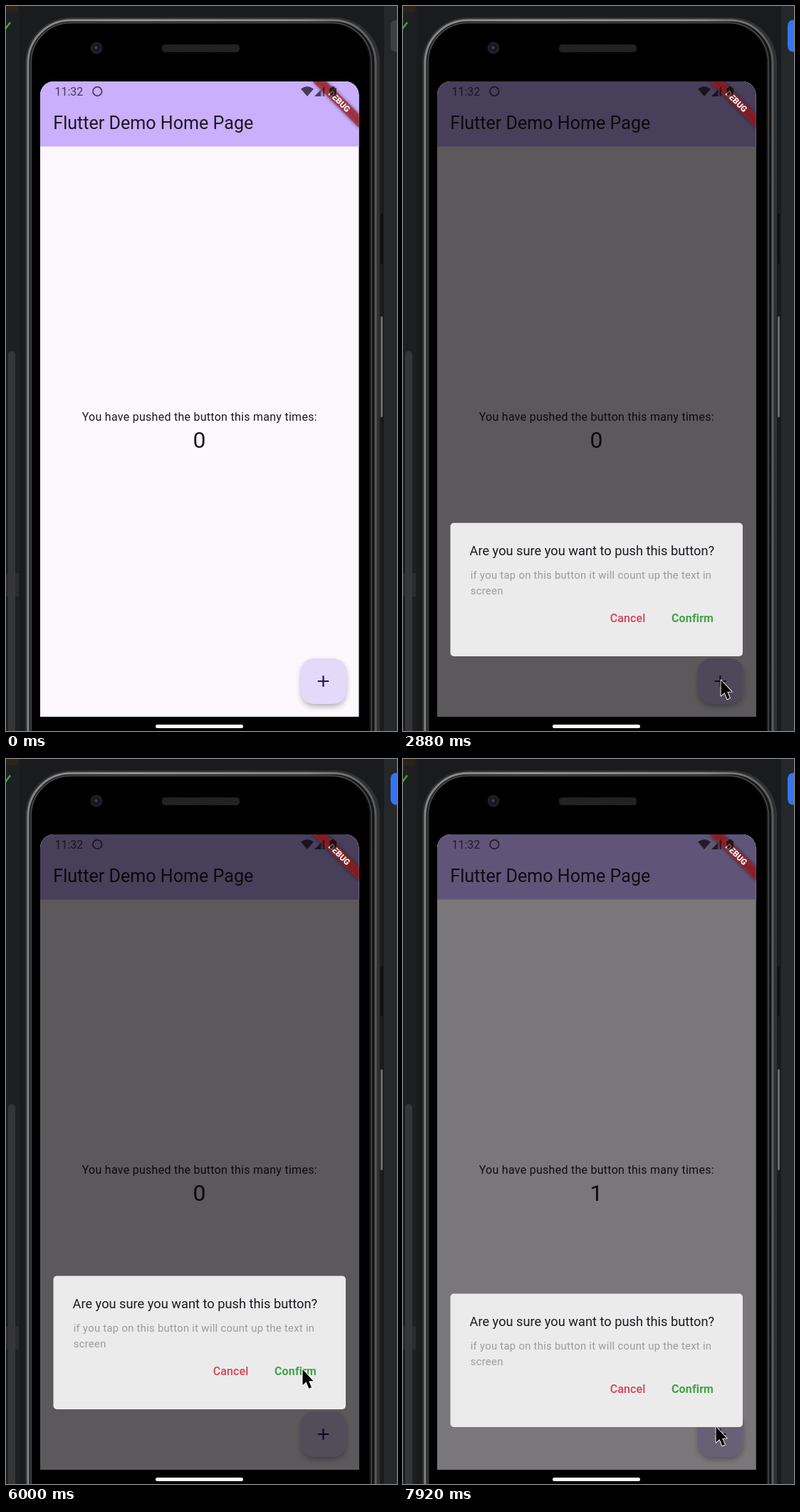
An HTML page that plays this animation: 549x1019 px, repeating every 8 s.

```html
<!DOCTYPE html>
<html lang="en">
<head>
<meta charset="utf-8">
<title>Confirm dialog demo</title>
<style>
  html, body { margin: 0; width: 100%; height: 100%; overflow: hidden; background: #1e2022; }
  svg { display: block; width: 549px; height: 1019px; }
  text { font-family: Roboto, sans-serif; fill: #1c1a1f; white-space: pre; }
  .body { font-size: 15.97px; letter-spacing: .285px; }
  .mid { text-anchor: middle; }
  .hint { font-size: 14.83px; letter-spacing: .285px; fill: #9b9a9c; }
  .action { font-size: 15.97px; letter-spacing: .15px; }
</style>
</head>
<body>
<svg viewBox="0 0 549 1019">
  <defs>
    <linearGradient id="rim" x1="0" x2="1" y1="0" y2="0">
      <stop offset="0" stop-color="#838384"/>
      <stop offset=".3" stop-color="#9a9a9b"/>
      <stop offset=".8" stop-color="#8c8c8d"/>
      <stop offset="1" stop-color="#5a5a5b"/>
    </linearGradient>
    <pattern id="mesh" width="4" height="4" patternUnits="userSpaceOnUse">
      <rect width="4" height="4" fill="#1d1d1d"/>
      <path d="M0 4L4 0" stroke="#303030"/>
    </pattern>
    <clipPath id="screen"><path d="M48 999V125a19 19 0 0 1 19-19H476.500a19 19 0 0 1 19 19V999z"/></clipPath>
    <filter id="soft" x="-50%" y="-50%" width="200%" height="200%"><feGaussianBlur stdDeviation="4"/></filter>
    <filter id="softBand" x="-50%" y="-100%" width="200%" height="300%"><feGaussianBlur stdDeviation="2.500"/></filter>
  </defs>

  <!-- desktop -->
  <rect width="549" height="1019" fill="#1a1b1c"/>
  <rect width="19" height="1019" fill="#1d1f20"/>
  <rect width="17" height="9" fill="#2c221a"/>
  <rect x="531" width="18" height="1019" fill="#24282a"/>
  <rect y="797" width="18" height="33" fill="#2a2c2e"/>
  <rect x="3" y="485" width="10" height="560" rx="5" fill="#343638"/>
  <path d="M-2 29L0 31L6 23" fill="none" stroke="#43a047" stroke-width="2.500"/>
  <rect id="tool" x="540" y="19.500" width="30" height="45" rx="8"/>

  <!-- phone -->
  <rect x="526" y="436" width="3" height="142" rx="1.500" fill="#6a6b6c"/>
  <rect x="526" y="292" width="3" height="70" rx="1.500" fill="#0e0e0e"/>
  <rect x="27" y="16" width="498" height="1100" rx="64" fill="#2f3031"/>
  <rect x="31" y="20" width="488" height="1100" rx="60" fill="#161616" stroke="url(#rim)" stroke-width="3"/>
  <rect x="35" y="23.500" width="478" height="1100" rx="56" fill="#111" stroke="#4c4c4e" stroke-width="1.500"/>
  <rect x="37" y="25" width="473" height="1100" rx="54"/>
  <circle cx="127" cy="59" r="8.500" fill="#1f1f22"/>
  <circle cx="127" cy="59" r="5" fill="#14141f"/>
  <circle cx="126.500" cy="58.500" r="2.200" fill="#3c3c72"/>
  <rect x="219" y="54" width="109" height="11" rx="4.500" fill="url(#mesh)"/>
  <rect x="210" y="1010" width="123" height="5" rx="2.500" fill="#fff"/>

  <g clip-path="url(#screen)">
    <rect id="page" x="48" y="106" width="448" height="893"/>
    <rect x="48" y="106" width="448" height="91.500" fill="#c9affc"/>
    <text x="66.300" y="173.300" font-size="25.1">Flutter Demo Home Page</text>
    <text class="body mid" x="271.800" y="583.200">You have pushed the button this many times:</text>
    <text id="count" class="mid" x="271.600" y="620.800" font-size="31.95">0</text>
    <rect x="415" y="922" width="62" height="62" rx="18" opacity=".32" filter="url(#soft)"/>
    <rect id="fab" x="413.800" y="917" width="64" height="64" rx="18.300"/>
    <path d="M437.700 949H453.300M445.500 941.200V956.800" stroke="#27105a" stroke-width="2.200"/>

    <rect id="dim" x="48" y="106" width="448" height="893"/>
    <g id="dialog">
      <rect x="66.500" y="726.500" width="410.500" height="187.500" rx="5" fill="#ebebec"/>
      <text x="93.500" y="771.800" font-size="18.25">Are you sure you want to push this button?</text>
      <text class="hint" x="94.700" y="805.300">if you tap on this button it will count up the text in</text>
      <text class="hint" x="94.700" y="827">screen</text>
      <text class="action" x="290.700" y="865.600" font-weight="500" style="fill:#d9434f">Cancel</text>
      <text class="action" x="377" y="865.600" font-weight="700" style="fill:#43a347">Confirm</text>
    </g>
    <g id="toast">
      <rect x="190.500" y="871.500" width="162.500" height="45.500" rx="9" fill="#42a346"/>
      <text class="body mid" x="271.900" y="900.200" style="fill:#f1f5f0">Successfully Done!</text>
    </g>

    <!-- corner banner -->
    <g transform="translate(495.500 106.500) rotate(45)">
      <rect x="-46" y="32" width="92" height="13.700" opacity=".5" filter="url(#softBand)"/>
      <rect x="-46" y="32" width="92" height="13.700" fill="#b71c1c" opacity=".63"/>
      <text class="mid" y="42.900" font-size="11.6" font-weight="900" style="fill:#fff">DEBUG</text>
    </g>

    <!-- status bar -->
    <g opacity=".66">
      <text x="68.500" y="126.300" font-size="16" style="fill:#000">11:32</text>
      <circle cx="128.300" cy="120" r="6.300" fill="none" stroke="#000" stroke-width="1.700"/>
      <path d="M414 116.500Q423 109.500 432 116.500L423 127z"/>
      <path d="M433 127L447 113V127z" fill-opacity=".3"/>
      <path d="M433 127L442 118V127zM445.500 115L447 113V127H445.500z"/>
      <path d="M454.500 115H457V113H461.500V115H464V127H454.500z"/>
    </g>
  </g>

  <path id="cursor" d="M0 0V22L5 17.500L8.800 26.800L12.500 25.200L8.700 16.200H15z"
        stroke="#fff" stroke-width="1.800" stroke-linejoin="round" paint-order="stroke"/>
</svg>
<script>
const LOOP = 8000, STEP = 80, DIM = 0.64;
const $ = id => document.getElementById(id);

const cursorPath = [
  [480, -40, 905], [640, 40, 921], [720, 147, 914], [800, 254, 927], [880, 314, 937],
  [960, 366, 925], [1040, 392, 922], [1120, 425, 938], [1280, 446.5, 947.5],
  [2960, 446.5, 947.5], [3440, 322, 860], [3840, 318, 858], [4320, 318, 858],
  [4720, 445, 958], [5360, 445, 958], [5840, 416.5, 858], [7120, 416.5, 858], [7360, 439.5, 938.5]
];
const toastFade = [[6480, 0], [6640, 1], [7120, 1], [7360, 0]];

// steps after a tap: [ms, slide offset, dim share, card opacity]
const opening = [[0, 290, 0, 0], [80, 178, 0.49, 0.88], [160, 25, 0.81, 1], [240, 3, 0.96, 1], [320, 0, 1, 1]];
const closing = [[0, 0, 1, 1], [80, 25, 0.81, 1], [160, 178, 0.49, 0.88], [240, 290, 0.15, 0], [320, 290, 0, 0]];
const transitions = [[0, closing, 320], [2320, opening], [4000, closing], [4960, opening], [6160, closing], [7760, opening]];

const ease = k => k * k * (3 - 2 * k);

function sample(table, t, curve = k => k) {
  const i = table.findIndex(row => row[0] > t);
  if (i === 0) return table[0].slice(1);
  if (i < 0) return table[table.length - 1].slice(1);
  const a = table[i - 1], b = table[i];
  const k = curve((t - a[0]) / (b[0] - a[0]));
  return a.slice(1).map((v, j) => v + (b[j + 1] - v) * k);
}

function draw(t) {
  const [start, steps, skip = 0] = transitions.filter(s => s[0] <= t).pop();
  const [offset, dim, alpha] = sample(steps, t - start + skip);
  $('dialog').setAttribute('transform', `translate(0 ${offset})`);
  $('dialog').setAttribute('opacity', alpha);
  $('dim').setAttribute('opacity', dim * DIM);

  const pressed = steps === opening && t - start < 720;
  $('fab').setAttribute('fill', pressed ? '#d8c8f4' : '#e5d9f9');

  const dulled = (t >= 4080 && t < 4960) || (t >= 6240 && t < 7760);
  $('page').setAttribute('fill', dulled ? '#ebebec' : '#fcf8fe');
  $('count').textContent = t >= 6240 ? 1 : 0;
  $('toast').setAttribute('opacity', sample(toastFade, t)[0]);
  $('tool').setAttribute('fill', t >= 2000 ? '#3574f0' : '#3d4043');

  const [x, y] = sample(cursorPath, t, t > 1280 ? ease : undefined);
  $('cursor').setAttribute('transform', `translate(${x} ${y})`);
}

const began = performance.now();
function tick() {
  const t = (performance.now() - began) % LOOP;
  draw(Math.floor(t / STEP) * STEP);
  requestAnimationFrame(tick);
}
tick();
</script>
</body>
</html>
```
